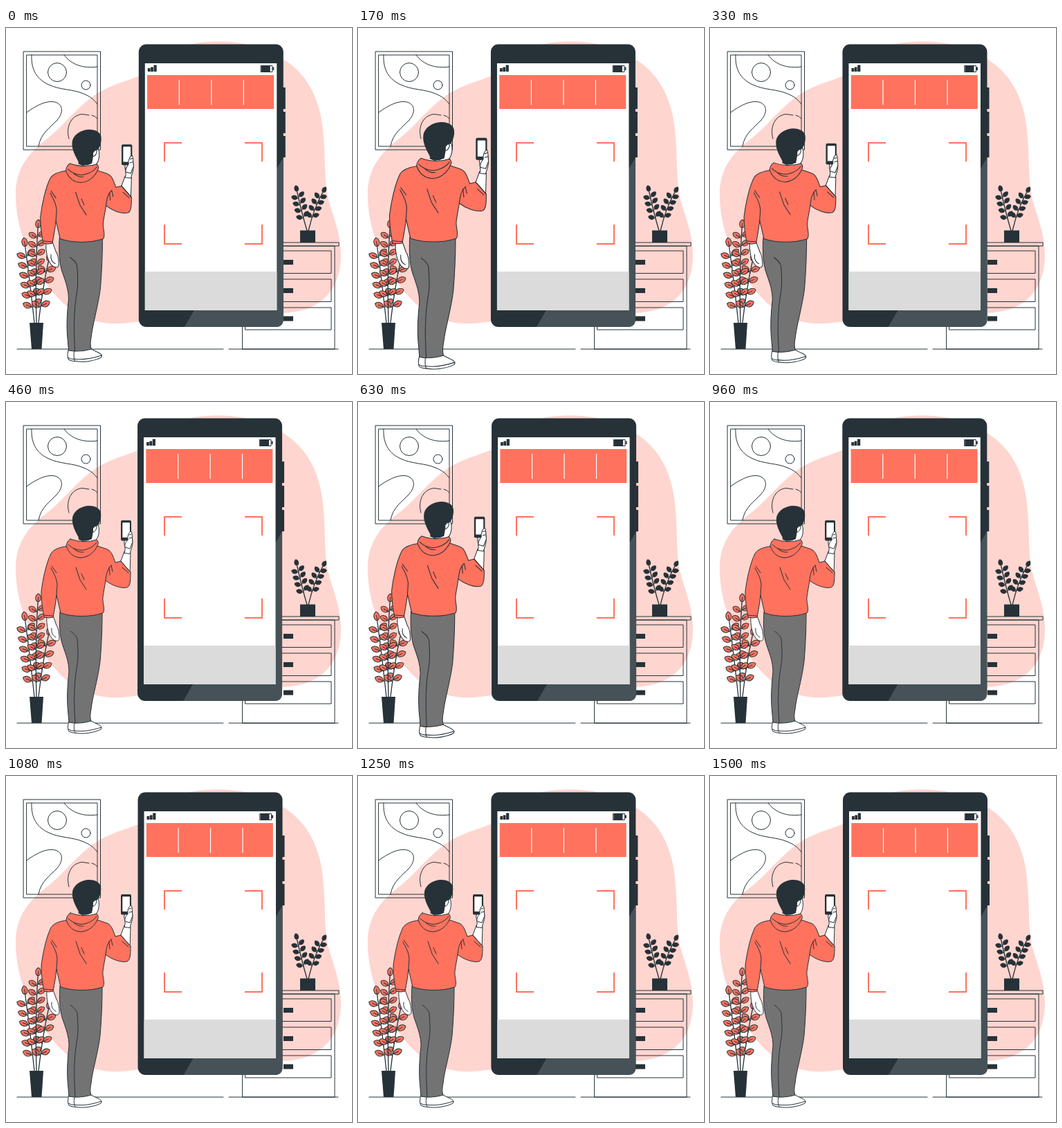
An HTML page for the animation above (1540 ms loop, 500 px wide and 500 px high).

```html
<!DOCTYPE html>
<html lang="en">
<head>
<meta charset="utf-8">
<title>Scan the screen</title>
<style>
  html, body { margin: 0; width: 100%; height: 100%; overflow: hidden; background: #fff; }
  svg { display: block; width: 100%; height: 100%; }
  .line { fill: none; stroke: #263238; stroke-width: 1; stroke-linecap: round; stroke-linejoin: round; }
  .white { fill: #fff; }
  .coral { fill: #ff725e; }
  .grey { fill: #737373; }
  .dark { fill: #263238; }
</style>
</head>
<body>
<svg viewBox="0 0 500 500">
  <path fill="#ffd5cf" d="M14 240C14 204 32 180 62 158C92 134 112 98 160 81C188 71 210 66 228 45C248 22 284 19 310 19.500C352 20 388 34 412 53C442 77 456 112 459 158C462 200 460 228 467 251C473 272 484 300 484 328C484 365 468 394 434 406C400 418 360 408 320 411C270 415 240 418 200 423C172 427 148 431 118 420C76 404 46 358 28 313C18 287 14 262 14 240Z"/>

  <g class="line">
    <path d="M16 464H314M322 464H480"/>
    <rect x="25.500" y="34" width="111" height="142"/>
    <rect x="30" y="39" width="102" height="132"/>
    <circle cx="74" cy="64" r="13.500"/>
    <circle cx="115.500" cy="82.500" r="6.500"/>
    <path d="M37 39C36 62 46 75 62 82C79 90 96 88 112 95C122 99 128 104 132 110"/>
    <path d="M84 39C94 53 112 59 132 56"/>
    <path d="M30 122C42 113 58 104 71 107C84 111 82 124 74 133C64 144 50 152 47 171"/>
    <path d="M91 160C86 143 94 126 110 124.500L120 126M124 126Q129 127 132 131"/>
  </g>

  <g class="line">
    <rect x="342" y="315" width="133" height="149"/>
    <rect x="338" y="310" width="143" height="5"/>
    <rect x="346" y="322" width="124" height="32.500"/>
    <rect x="346" y="363" width="124" height="32.500"/>
    <rect x="346" y="404" width="124" height="32"/>
  </g>
  <path class="dark" d="M401 335h14v7h-14zM401 376h14v7h-14zM401 416.500h14v7h-14zM425 292.500h22v17.500h-22z"/>
  <g id="sprigs"></g>
  <g id="bush"></g>
  <path class="dark" d="M34 426H54L51.500 464H37Z"/>

  <g id="phone">
    <path class="dark" d="M399 86h5v31h-5zM399 121h5v31h-5zM399 156h5v31h-5z"/>
    <rect class="dark" x="192" y="23.500" width="209" height="408.500" rx="11"/>
    <path fill="#465257" d="M258 432L401 187V421Q401 432 390 432Z"/>
    <rect class="white" x="201" y="51" width="190.500" height="357"/>
    <rect class="coral" x="204.300" y="68" width="183" height="49"/>
    <path fill="none" stroke="#fff" stroke-width="1.200" d="M250.500 75V111M297 75V111M343.500 75V111"/>
    <rect fill="#dbdbdb" x="201" y="352" width="190.500" height="56"/>
    <path class="dark" d="M205 58h3.800v5H205zM209.300 56.500h3.800V63h-3.800zM213.700 53.500h4.200V63h-4.200zM385.500 56.500h2v4.500h-2z"/>
    <rect class="line" x="368.700" y="54.500" width="16.300" height="9"/>
    <rect class="dark" x="369" y="55" width="13" height="8"/>
  </g>
  <path fill="none" stroke="#ff725e" stroke-width="2" d="M229 193V166H254M345 166H370V193M370 284V312H345M254 312H229V284"/>

  <g id="man">
    <path class="line white" d="M59 309C58 322 61 335 66 341C70 346 76 347 77 342C77 335 76 327 73 323L68 309Z"/>
    <path class="line" d="M66 327C65 334 68 338 72 340"/>
    <path class="line white" d="M91 461C89 468 89 473 91 476Q99 480 106 477L109 461Z"/>
    <path class="line white" d="M99 462C98 470 98 475 100 478C112 481 130 477 137 473C140 470 136 467 131 465L121 460Z"/>
    <path class="line" d="M90 473Q95 476 99 475C112 477 126 474 138 470"/>
    <path class="line grey" d="M78 303C77 320 77 337 82 352C87 366 91 377 91 390C89 407 88 425 89 440L91 463Q106 466 123 461C121 455 122 449 123 444C125 425 133 400 136 375C138 350 139 330 139 303Z"/>
    <path class="line" d="M93 331C98 335 102 338 103 343C104 358 105 370 102 385C98 410 98 435 100 464"/>
    <path class="line white" d="M171 216L164 235L179 250L180 218Z"/>
    <path class="line coral" d="M92 208C82 209 70 211 65 219C58 233 53 257 51 274C51 289 53 301 55 311Q62 313 68 311C70 300 72 290 73 279L79 305C98 311 121 311 140 305C144 300 139 290 140 282C141 274 143 265 144 258C153 265 166 270 175 268C180 266 180 256 180 246L166 230L158 232C154 221 152 214 144 212L132 208Z"/>
    <path class="line" d="M65 240C69 248 73 253 74 264L73 279M66 237L73 247M144 258C145 249 146 242 152 236M152 236L154 245M149 239L150 250M101 239L107 257L116 271M109 248L113 257M166 230L180 246M168 239L177 247M68 309Q61 309 55 308"/>
    <path class="line white" d="M121 169L133 177C136 186 134 197 128 201L118 204L105 198Z"/>
    <path class="dark" d="M104 194C99 185 95 176 96 168C97 158 108 150 121 150C129 150 136 154 137 160C138 167 136 174 132 179C129 180 127 184 126 187L124 198Q114 203 106 199Z"/>
    <path class="line white" d="M126 182Q130 177 131 181Q130 187 126 188"/>
    <path class="line coral" d="M93 198Q112 205 131 199Q135 203 132 208C127 218 119 224 109 225C98 225 91 219 87 208Q88 201 93 198Z"/>
    <path class="line" d="M90 206C97 213 107 216 116 213Q126 210 131 203M98 212Q104 218 112 217"/>
    <path class="line white" d="M171 218C174 212 170 206 171 201L176 190C178 186 181 185 181 189C182 195 184 203 182 209L179 219Z"/>
    <rect class="dark" x="166" y="171" width="15" height="29.500" rx="2"/>
    <rect class="white" x="168.300" y="174.300" width="10.600" height="21.500" rx=".6"/>
    <path class="line white" d="M176 199C175 194 178 187 181 187C183 190 182 197 183 202L179 212L172 210C171 205 174 202 176 199Z"/>
    <path class="line" d="M178 192L181 191M178 197L182 196"/>
  </g>
</svg>
<script>
  const $ = id => document.getElementById(id);
  const LOOP = 1540, FPS = 24, CYCLE = 1500, LEAD = 30;
  const CX = 115.7, CY = 314.7;

  // Keyframes as [share of cycle, value]
  const PULSE = [[0, 1], [.1, 1.1], [.3, 1], [.4, 1], [.5, 1.1], [.6, 1], [1, 1]];
  const SHAKE = [[0, 0], [.1, -1], [.2, 2], [.3, -4], [.4, 4], [.5, -4],
                 [.6, 4], [.7, -4], [.8, 2], [.9, -1], [1, 0]];

  function track(keys, p) {
    const i = Math.max(1, keys.findIndex(k => k[0] >= p));
    const [a, from] = keys[i - 1], [b, to] = keys[i];
    return from + (to - from) * (p - a) / (b - a);
  }

  // A stem along a quadratic curve with leaf pairs and one leaf at its tip
  function twig([x0, y0], [x1, y1], [x2, y2], pairs, start, size, fill) {
    const bez = (a, b, c, u) => (1 - u) ** 2 * a + 2 * u * (1 - u) * b + u * u * c;
    const h = size * .36;
    const leaf = (x, y, turn) =>
      `<path class="line ${fill}" stroke-width=".8" transform="translate(${x} ${y}) rotate(${turn})"
        d="M2 0C${size * .3} ${-h} ${size * .8} ${-h} ${size} 0C${size * .8} ${h} ${size * .3} ${h} 2 0ZM0 0H${size * .65}"/>`;
    let out = `<path class="line" style="stroke-width:1.3" d="M${x0} ${y0}Q${x1} ${y1} ${x2} ${y2}"/>`;
    for (let i = 0; i <= pairs; i++) {
      const u = start + (1 - start) * i / pairs;
      const x = bez(x0, x1, x2, u), y = bez(y0, y1, y2, u);
      const dx = (1 - u) * (x1 - x0) + u * (x2 - x1), dy = (1 - u) * (y1 - y0) + u * (y2 - y1);
      const dir = Math.atan2(dy, dx) * 180 / Math.PI;
      out += i < pairs
        ? leaf(x, y, dir - 62) + leaf(x, y - 2, dir + 56)
        : leaf(x, y, dir);
    }
    return out;
  }

  $('bush').innerHTML =
    twig([41, 426], [35, 370], [28, 318], 6, .2, 15, 'coral') +
    twig([47, 426], [53, 375], [61, 339], 4, .22, 15, 'coral') +
    twig([44, 426], [42, 350], [46, 291], 7, .26, 14, 'coral');
  $('sprigs').innerHTML =
    twig([435, 293], [426, 262], [421, 238], 4, .3, 10.500, 'dark') +
    twig([437, 293], [445, 260], [457, 239], 4, .3, 10.500, 'dark');

  function draw(ms) {
    const step = Math.floor((ms % LOOP + 5) * FPS / 1000);
    const p = Math.min(1, (step * 1000 / FPS + LEAD) / CYCLE);
    const s = track(PULSE, p);
    $('phone').setAttribute('transform', `translate(${track(SHAKE, p)} 0)`);
    $('man').setAttribute('transform', `translate(${CX} ${CY}) scale(${s}) translate(${-CX} ${-CY})`);
  }

  let begin;
  function tick(now) {
    begin ??= now;
    draw(now - begin);
    requestAnimationFrame(tick);
  }
  draw(0);
  requestAnimationFrame(tick);
</script>
</body>
</html>
```
